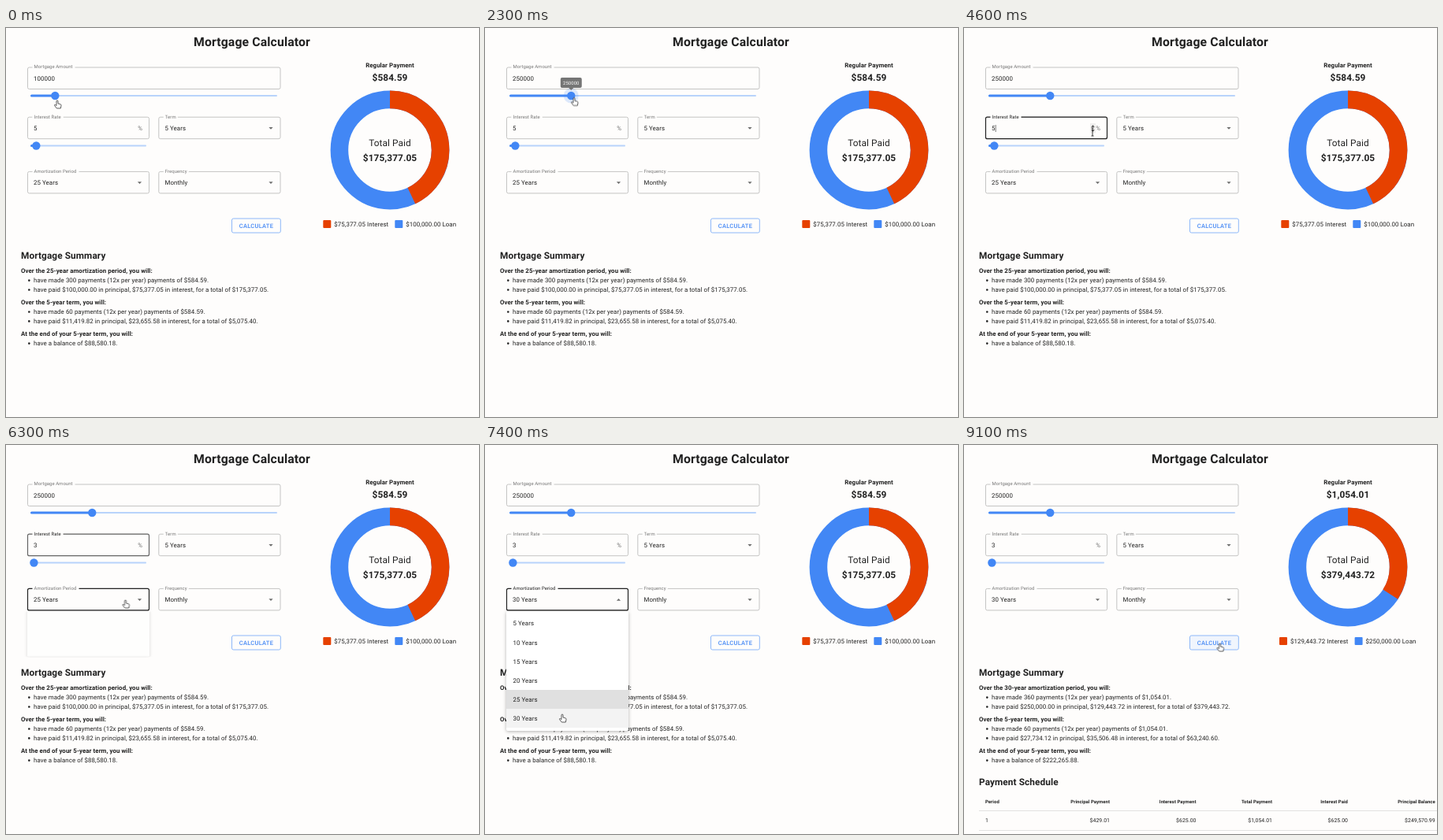
These frames come from a looping animation (600x494 px, 10000 ms). An HTML page:

```html
<!DOCTYPE html>
<html lang="en">
<head>
<meta charset="utf-8">
<title>Mortgage Calculator</title>
<style>
  html, body { margin: 0; width: 100%; height: 100%; overflow: hidden; background: #fefdfc; }
  svg { display: block; width: 600px; height: 494px; }

  text {
    font: 400 7.87px Roboto, Arial, sans-serif;
    letter-spacing: .00938em;
    fill: #212121;
    text-rendering: geometricPrecision;
  }
  .b { font-weight: 700; }
  .h1 { font-size: 15.74px; }
  .h2 { font-size: 11.8px; }
  .mid { text-anchor: middle; }
  .end { text-anchor: end; }
  .cell { font-size: 6.89px; }
  .th, .label { font-size: 5.95px; }
  .label, .unit { fill: #777; }
  .label.dark { fill: #212121; }
  .btn { font-size: 7.5px; font-weight: 500; letter-spacing: .035em; fill: #4287f5; }
  .tip { font-size: 5.95px; fill: #fff; }

  .box { fill: none; stroke: #c4c4c3; }
  .focus { fill: none; stroke: #222; stroke-width: 1.2; }
  .bg { fill: #fefdfc; }
  .caret-down { fill: #6b6b6b; }
  .blue { fill: #4287f5; }
  .red { fill: #e64100; }
  .rail { fill: #b8d3fb; }
  .ring { fill: none; stroke-width: 22.6; }
  .rule { stroke: #e2e2e1; }
  .pointer { fill: #fff; stroke: #333; stroke-width: .8; stroke-linejoin: round; }

  /* All animations are driven by one clock, --t, in ms. */
  .anim {
    animation: 10s linear infinite paused;
    animation-delay: calc(var(--t, 0) * -1ms);
  }
  #cursor { animation-name: travel; }
  #halo { animation-name: halo; }
  #bubble { animation-name: bubble; transform-origin: 0 79px; }
  #menu { animation-name: menu; transform-origin: 0 211px; filter: drop-shadow(0 1.5px 2px rgba(0,0,0,.3)); }
  #items { animation-name: items; }
  #share { animation-name: share; }
  #ripple { animation-name: ripple; transform-origin: 324px 252px; }
  #rateFocus { animation-name: rateFocus; }

  @keyframes travel {
    0%, 3% { transform: translate(65px, 92px); animation-timing-function: ease-in-out; }
    21%, 26% { transform: translate(113px, 88.5px); animation-timing-function: ease-in-out; }
    33%, 43% { transform: translate(49px, 134px); animation-timing-function: ease-in-out; }
    46%, 56% { transform: translate(163px, 132px); animation-timing-function: ease-in-out; }
    61%, 65% { transform: translate(151.5px, 197px); }
    67% { transform: translate(133px, 228px); }
    69% { transform: translate(90px, 297.5px); }
    72%, 75% { transform: translate(98px, 342px); }
    78% { transform: translate(136px, 323px); }
    79% { transform: translate(200px, 302px); }
    80% { transform: translate(257.5px, 278.5px); }
    81% { transform: translate(297px, 263px); }
    83%, 100% { transform: translate(324.5px, 252px); }
  }
  @keyframes halo {
    0%, 1% { opacity: 0; }
    3%, 26% { opacity: .18; }
    29%, 100% { opacity: 0; }
  }
  @keyframes bubble {
    0%, 1% { transform: scale(0); }
    3%, 26% { transform: scale(1); }
    28%, 100% { transform: scale(0); }
  }
  @keyframes menu {
    0%, 62% { opacity: 0; transform: scaleY(.3); }
    63% { opacity: .5; transform: scaleY(.38); }
    65%, 74% { opacity: 1; transform: none; }
    77%, 100% { opacity: 0; transform: none; }
  }
  @keyframes items {
    0%, 63% { opacity: 0; }
    65%, 100% { opacity: 1; }
  }
  @keyframes share {
    0%, 85% { stroke-dasharray: 42.98 100; animation-timing-function: cubic-bezier(.17, .84, .44, 1); }
    91%, 100% { stroke-dasharray: 34.11 100; }
  }
  @keyframes ripple {
    0%, 84% { opacity: 0; transform: scale(.1); }
    85% { opacity: .25; transform: scale(.2); }
    88% { opacity: .2; transform: scale(1); }
    91%, 100% { opacity: 0; transform: scale(1); }
  }
  @keyframes rateFocus {
    0%, 29% { opacity: 0; }
    30%, 32% { opacity: .5; }
    33%, 62% { opacity: 1; }
    63% { opacity: .6; }
    64%, 100% { opacity: 0; }
  }
</style>
</head>
<body>
<svg id="stage" viewBox="0 0 600 494" xmlns="http://www.w3.org/2000/svg"></svg>
<script>
const LOOP = 10000, TICK = 100;
const stage = document.getElementById('stage');

const text = (x, y, str, cls = '', attrs = '') =>
  `<text x="${x}" y="${y}" class="${cls}" ${attrs}>${str}</text>`;

// Visible from tick a up to tick b.
const during = (a, b, body) => `<g data-on="${a},${b}">${body}</g>`;

const frame = (x, y, w, cls, attrs = '') =>
  `<rect x="${x}" y="${y}" width="${w}" height="27.5" rx="2" class="${cls}" ${attrs}/>`;

const field = (x, y, w, label, gap) =>
  frame(x, y, w, 'box') +
  `<rect x="${x + 6}" y="${y - 2}" width="${gap + 4}" height="4" class="bg"/>` +
  text(x + 8, y + 1.3, label, 'label');

const arrow = (x, y, dir = 1) =>
  `<path class="caret-down" d="M${x - 2.6} ${y - 1.3 * dir}h5.2l-2.6 ${2.7 * dir}z"/>`;

const slider = (id, y, w, extra = '') =>
  `<rect x="31" y="${y - 1}" width="${w}" height="2" rx="1" class="rail"/>
   <rect id="${id}Track" x="31" y="${y - 1.5}" height="3" rx="1.5" class="blue"/>
   <g id="${id}Thumb">${extra}<circle cy="${y}" r="5.2" class="blue"/></g>`;

const bullet = (y, str) =>
  `<circle cx="29.3" cy="${y - 2.6}" r="1.3" fill="#212121"/>` + text(35, y, str);

const paid = ([loan, interest, total]) =>
  `have paid ${loan} in principal, ${interest} in interest, for a total of ${total}.`;

function report(d) {
  const [loan, interest, total] = d.full;
  const [redX, redText, blueX, blueText] = d.legend;
  const made = n => `have made ${n} payments (12x per year) payments of ${d.payment}.`;
  return text(487, 66.7, d.payment, 'b h2 mid') +
    text(487, 168.5, total, 'b h2 mid') +
    `<rect x="${redX}" y="244" width="10" height="10" rx="1" class="red"/>` +
    text(redText, 251.7, interest + ' Interest') +
    `<rect x="${blueX}" y="244" width="10" height="10" rx="1" class="blue"/>` +
    text(blueText, 251.7, loan + ' Loan') +
    text(19, 311.2, `Over the ${d.years}-year amortization period, you will:`, 'b') +
    bullet(323.2, made(d.years * 12)) +
    bullet(335.1, paid(d.full)) +
    text(19, 351.2, 'Over the 5-year term, you will:', 'b') +
    bullet(363.1, made(60)) +
    bullet(375, paid(d.term)) +
    text(19, 391.3, 'At the end of your 5-year term, you will:', 'b') +
    bullet(403.2, `have a balance of ${d.balance}.`);
}

const first = {
  years: 25, payment: '$584.59', balance: '$88,580.18',
  full: ['$100,000.00', '$75,377.05', '$175,377.05'],
  term: ['$11,419.82', '$23,655.58', '$5,075.40'],
  legend: [402.3, 416.3, 493.3, 507.3],
};
const second = {
  years: 30, payment: '$1,054.01', balance: '$222,265.88',
  full: ['$250,000.00', '$129,443.72', '$379,443.72'],
  term: ['$27,734.12', '$35,506.48', '$63,240.60'],
  legend: [400, 414, 495.6, 509.6],
};

const columns = [
  [185, 'Principal Payment', '$429.01'],
  [294.5, 'Interest Payment', '$625.00'],
  [391, 'Total Payment', '$1,054.01'],
  [487, 'Interest Paid', '$625.00'],
  [597.7, 'Principal Balance', '$249,570.99'],
];
const schedule = text(19, 431.8, 'Payment Schedule', 'b h2') +
  text(27, 454.6, 'Period', 'b th') + text(27, 479, '1', 'cell') +
  columns.map(([x, head, cell]) => text(x, 454.6, head, 'b th end') + text(x, 479, cell, 'cell end')).join('') +
  '<path class="rule" d="M19 464.5H600M19 489.5H600"/>';

const halo = '<circle id="halo" class="anim blue" cy="86" r="9.5"/>';
const bubble = `<g id="bubble" class="anim">
  <path fill="#757575" d="M-11.5 63h23a2 2 0 0 1 2 2v9a2 2 0 0 1-2 2h-8.5l-3 3-3-3h-8.5a2 2 0 0 1-2-2v-9a2 2 0 0 1 2-2z"/>
  ${text(0, 71.7, '', 'tip mid', 'id="tip"')}</g>`;

const form =
  field(27.5, 50, 320.5, 'Mortgage Amount', 50) +
  text(35, 66.6, '', '', 'id="amount"') +
  slider('amount', 86, 313, halo + bubble) +

  field(27.5, 113.2, 154, 'Interest Rate', 35) +
  frame(27.5, 113.2, 154, 'focus', 'id="rateFocus" style="opacity:0"').replace('class="focus"', 'class="focus anim"').replace(' style="opacity:0"', '') +
  `<rect x="33.5" y="111" width="39" height="4.5" class="bg"/>` +
  during(0, 33, text(35.5, 115, 'Interest Rate', 'label')) +
  during(33, 64, text(35.5, 115, 'Interest Rate', 'label dark')) +
  during(64, 100, text(35.5, 115, 'Interest Rate', 'label')) +
  text(35, 130.2, '', '', 'id="rate"') +
  text(167.3, 130.2, '%', 'unit') +
  during(30, 58, `<rect x="160" y="121" width="7" height="12.5" fill="#f0efee"/>
    <path fill="#444" d="M161.3 125.8h4.4l-2.2-2.6zM161.3 129.2h4.4l-2.2 2.6z"/>`) +
  [[34, 39], [44, 57]].map(([a, b]) => during(a, b, '<path d="M40.2 123v9" stroke="#444" stroke-width=".7"/>')).join('') +
  slider('rate', 149.5, 147) +

  field(193.8, 113.2, 154.2, 'Term', 14) + text(201.5, 130.2, '5 Years') + arrow(336, 127.3) +

  field(27.5, 182.4, 154, 'Amortization Period', 55) +
  during(60, 85, frame(27.5, 182.4, 154, 'focus') + '<rect x="33.5" y="180" width="59" height="4.5" class="bg"/>') +
  during(60, 64, text(35.5, 183.9, 'Amortization Period', 'label')) +
  during(64, 85, text(35.5, 183.9, 'Amortization Period', 'label dark')) +
  during(0, 74, text(35, 199.3, '25 Years')) +
  during(74, 100, text(35, 199.3, '30 Years')) +
  during(0, 64, arrow(169.5, 196.5)) +
  during(64, 75, arrow(169.5, 196.5, -1)) +
  during(75, 100, arrow(169.5, 196.5)) +

  field(193.8, 182.4, 154.2, 'Frequency', 28) + text(201.5, 199.3, 'Monthly') + arrow(336, 196.5) +

  during(82, 100, '<rect x="286.5" y="242" width="61.8" height="18" rx="2" fill="#f0f5fd"/>') +
  `<clipPath id="btnClip"><rect x="286.5" y="242" width="61.8" height="18" rx="2"/></clipPath>
   <g clip-path="url(#btnClip)"><circle id="ripple" class="anim blue" cx="324" cy="252" r="40"/></g>
   <rect x="286.5" y="242" width="61.8" height="18" rx="2" fill="none" stroke="#8db7f8"/>` +
  text(317.5, 253.6, 'CALCULATE', 'btn mid');

const chart =
  text(487, 50.3, 'Regular Payment', 'b mid') +
  `<circle class="ring" cx="487" cy="155" r="64.1" stroke="#4287f5"/>
   <circle id="share" class="ring anim" cx="487" cy="155" r="64.1" stroke="#e64100"
     pathLength="100" transform="rotate(-90 487 155)"/>` +
  text(487, 150.3, 'Total Paid', 'h2 mid');

const row = i => 214.6 + 24.1 * i;
const shade = (i, fill) => `<rect x="27" y="${row(i)}" width="155" height="24.1" fill="${fill}"/>`;
const menu = `<g id="menu" class="anim">
  <rect x="27" y="211" width="155" height="152" rx="2" fill="#fff"/>
  <g id="items" class="anim">` + shade(4, '#e0e0e0') + during(71, 78, shade(5, '#f3f3f3')) +
  [5, 10, 15, 20, 25, 30].map((n, i) => text(35.5, row(i) + 14.8, n + ' Years')).join('') +
  '</g></g>';

const shapes = {
  hand: '<path class="pointer" d="M-1 1a1 1 0 0 1 2 0v3l2.8.7q1.4.4 1.2 1.8l-.7 3.5h-5l-2.8-3.6q-.4-1 .9-.9l1.6 1z"/>',
  arrow: '<path class="pointer" d="M0 0v7.4l1.7-1.5 1.2 2.7 1.2-.5-1.2-2.6h2.3z"/>',
  beam: '<path fill="none" stroke="#222" stroke-width=".9" d="M-1.5-5h3M0-5v10M-1.5 5h3"/>',
};
const cursor = '<g id="cursor" class="anim">' + [
  [0, 27, 'hand'], [27, 29, 'arrow'], [29, 58, 'beam'], [58, 60, 'arrow'],
  [60, 77, 'hand'], [77, 82, 'arrow'], [82, 100, 'hand'],
].map(([a, b, name]) => during(a, b, shapes[name])).join('') + '</g>';

stage.innerHTML =
  text(312, 22.9, 'Mortgage Calculator', 'b h1 mid') + form + chart +
  text(19, 293.3, 'Mortgage Summary', 'b h2') +
  during(0, 86, report(first)) + during(86, 100, report(second) + schedule) +
  menu + cursor;

const $ = id => document.getElementById(id);
const timed = [...stage.querySelectorAll('[data-on]')].map(el => [el, ...el.dataset.on.split(',').map(Number)]);

function setSlider(id, len) {
  $(id + 'Track').setAttribute('width', len);
  $(id + 'Thumb').setAttribute('transform', `translate(${31 + len})`);
}

const clamp = v => Math.min(1, Math.max(0, v));
const smooth = p => p * p * (3 - 2 * p);

function render(tick) {
  document.documentElement.style.setProperty('--t', tick * TICK);
  for (const [el, a, b] of timed) el.style.display = tick >= a && tick < b ? '' : 'none';

  // The thumb snaps to the nearest step under the pointer.
  const reach = 34 + 48 * smooth(clamp((tick - 3) / 18));
  const amount = Math.round(reach / 313 * 40) * 25000;
  $('amount').textContent = $('tip').textContent = amount;
  setSlider('amount', 313 * amount / 1e6);

  const rate = tick < 50 ? 5 : tick < 53 ? 4 : 3;
  $('rate').textContent = rate;
  setSlider('rate', 1.47 * rate);
}

let start;
function loop(now) {
  start ??= now;
  render(Math.floor((now - start) % LOOP / TICK));
  requestAnimationFrame(loop);
}
render(0);
requestAnimationFrame(loop);
</script>
</body>
</html>
```
